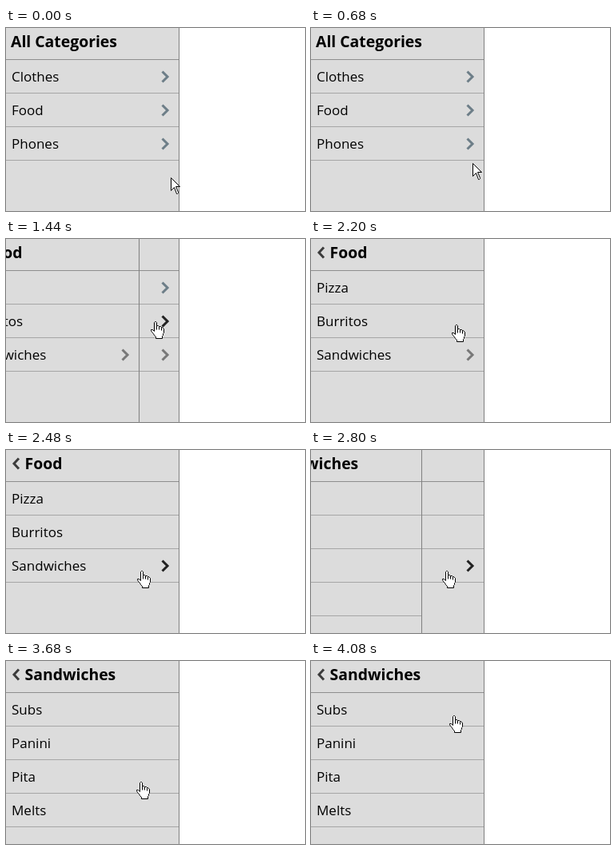
These frames come from a looping animation (374x229 px, 4720 ms). An HTML page:

```html
<!DOCTYPE html>
<html lang="en">
<head>
<meta charset="utf-8">
<title>Sliding category menu</title>
<style>
  html, body { margin: 0; width: 100%; height: 100%; overflow: hidden; background: #fff; }
  svg { display: block; }
  text { font: 17px "Open Sans", "Noto Sans", sans-serif; fill: #000; }
  .title { font-size: 19.4px; font-weight: 700; }
  .chevron { fill: none; stroke-width: 3; }
  .cursor { fill: #fff; stroke: #000; stroke-width: 1; }
</style>
</head>
<body>
<svg id="stage" width="374" height="229" viewBox="0 0 374 229"></svg>
<script>
const LOOP = 4720, TICK = 40, WIDTH = 217, ROW = 42, TOP = 39;
const SLATE = '#6d7e88', GRAY = '#787878', DARK = '#222';
const stage = document.getElementById('stage');

function add(parent, tag, attrs, text) {
  const el = document.createElementNS('http://www.w3.org/2000/svg', tag);
  for (const key in attrs) el.setAttribute(key, attrs[key]);
  if (text) el.textContent = text;
  parent.appendChild(el);
  return el;
}

function rect(parent, x, y, width, height, fill) {
  add(parent, 'rect', { x, y, width, height, fill });
}

// items: [label, chevron colour or nothing]
function makePanel(title, items, isChild) {
  const group = add(stage, 'g', {});
  rect(group, 0, 0, WIDTH, 229, '#dcdcdc');
  rect(group, 0, TOP, WIDTH, 1, '#8e8e8e');
  if (isChild) {
    add(group, 'path', { class: 'chevron', d: 'M16 10.5L10 17L16 23.5', stroke: '#3c3c3c' });
  }
  add(group, 'text', { class: 'title', x: isChild ? 23.5 : 6, y: 24 }, title);
  const chevrons = items.map(([label, color], i) => {
    const y = TOP + i * ROW;
    rect(group, 0, y + ROW, WIDTH, 1, '#a6a6a6');
    add(group, 'text', { x: 7, y: y + 28 }, label);
    return color && add(group, 'path', {
      class: 'chevron', stroke: color,
      d: `M195.5 ${y + 15.5}l6.5 6.5l-6.5 6.5`
    });
  });
  rect(group, WIDTH - 1, 0, 1, 229, '#808080');
  return { group, chevrons };
}

const root = makePanel('All Categories', [['Clothes', SLATE], ['Food', SLATE], ['Phones', SLATE]]);
const food = makePanel('Food', [['Pizza'], ['Burritos'], ['Sandwiches', GRAY]], true);
const sandwiches = makePanel('Sandwiches', [['Subs'], ['Panini'], ['Pita'], ['Melts']], true);

const arrow = add(stage, 'path', {
  class: 'cursor',
  d: 'M.5 .5V16.5L4.5 12.5L7.5 20.5H8.5L9.5 19.5V18.5L6.5 11.5H11.5Z'
});
const hand = add(stage, 'path', {
  class: 'cursor',
  d: 'M5.5 .5H6.5L7.5 1.5V5.5H9.5L10.5 6.5H12.5L13.5 7.5H14.5L16.5 9.5V14.5L15.5 15.5V17.5' +
     'L14.5 18.5V21.5H6.5V19.5L4.5 17.5L3.5 15.5L1.5 13.5L.5 11.5V10.5H2.5L4.5 12.5V1.5Z' +
     'M7.5 5.5V10.5M10.5 6.5V10.5M13.5 7.5V11.5'
});

const clamp = v => Math.min(1, Math.max(0, v));
const linear = t => t;
const sine = t => (1 - Math.cos(Math.PI * t)) / 2;

// cubic-bezier(0, 0, .58, 1)
function easeOut(t) {
  let lo = 0, hi = 1;
  for (let i = 0; i < 24; i++) {
    const s = (lo + hi) / 2;
    if (1.74 * s * s * (1 - s) + s ** 3 < t) lo = s; else hi = s;
  }
  return lo * lo * (3 - 2 * lo);
}

// Pointer paths: quadratic curves from, bend, to
const moves = [
  { start: 520, end: 1040, ease: sine, pts: [[206, 187], [196, 145], [187, 103]] },
  { start: 2160, end: 2480, ease: linear, pts: [[187, 103], [167.5, 118], [170, 151]] },
  { start: 3640, end: 3680, ease: linear, pts: [[170, 151], [170, 151], [169, 151]] },
  { start: 3720, end: 4080, ease: sine, pts: [[169, 151], [172, 110], [179, 68]] }
];

function pointerAt(time) {
  const move = moves.filter(m => time >= m.start).pop() || moves[0];
  const e = move.ease(clamp((time - move.start) / (move.end - move.start)));
  const [a, b, c] = move.pts;
  return [0, 1].map(k =>
    Math.round((1 - e) ** 2 * a[k] + 2 * e * (1 - e) * b[k] + e * e * c[k]));
}

function slide(panel, time, start) {
  const x = Math.round((easeOut(clamp((time - start) / 200)) - 1) * WIDTH);
  panel.group.setAttribute('transform', `translate(${x})`);
  panel.group.style.display = time > start ? '' : 'none';
}

function draw(now) {
  const time = Math.floor((now % LOOP) / TICK) * TICK;
  const [x, y] = pointerAt(time);
  const row = Math.floor((y - TOP - 1) / ROW);
  const onList = row < 3;

  arrow.style.display = onList ? 'none' : '';
  hand.style.display = onList ? '' : 'none';
  arrow.setAttribute('transform', `translate(${x} ${y})`);
  hand.setAttribute('transform', `translate(${x - 6} ${y})`);

  const [, foodMark, phonesMark] = root.chevrons;
  foodMark.setAttribute('stroke', row <= 1 ? DARK : SLATE);
  phonesMark.setAttribute('stroke', row === 2 ? DARK : row < 2 ? GRAY : SLATE);
  food.chevrons[2].setAttribute('stroke', row === 2 ? DARK : GRAY);

  slide(food, time, 1323);
  slide(sandwiches, time, 2708);
}

const begin = performance.now();
function frame() {
  draw(performance.now() - begin);
  requestAnimationFrame(frame);
}
frame();
</script>
</body>
</html>
```
